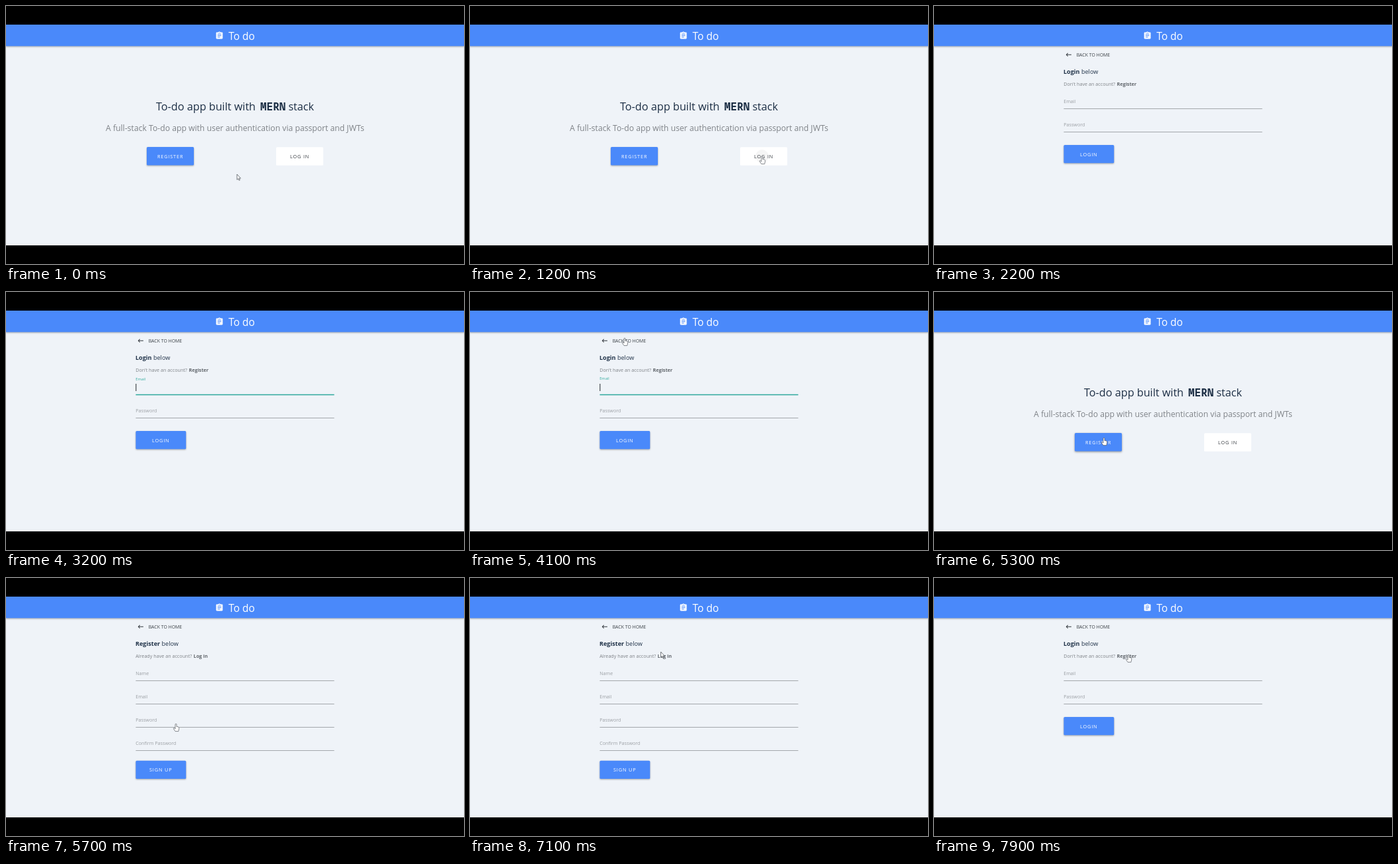
An HTML page that plays this animation: 690 px wide and 388 px high, repeating every 8000 ms.

```html
<!DOCTYPE html>
<html lang="en">
<head>
<meta charset="utf-8">
<title>To do</title>
<style>
  html, body { margin: 0; width: 100%; height: 100%; overflow: hidden; background: #000; }
  svg { display: block; width: 690px; height: 388px; }
  text { font-family: "Open Sans", "Noto Sans", sans-serif; white-space: pre; }
  .blue { fill: #4a89fa; }
  .white { fill: #fff; }
  .brand { font-size: 15.5px; fill: #fff; }
  .title { font-size: 16.2px; fill: #1d2f45; }
  .mono { font: bold 16px "Noto Sans Mono", "DejaVu Sans Mono", monospace; }
  .lead { font-size: 12.18px; fill: #7f8388; text-anchor: middle; }
  .small { font-size: 7.2px; letter-spacing: .9px; }
  .large { font-size: 7.4px; letter-spacing: .8px; fill: #fff; }
  .back { font-size: 6.9px; fill: #3c4248; }
  .head { font-size: 9.1px; fill: #22344a; }
  .note { font-size: 7.2px; fill: #7f8388; }
  .link { font-weight: bold; fill: #62676d; }
  .label { font-size: 7.2px; fill: #9da1a6; }
  .rule { stroke: #a4a8ac; stroke-width: 1; }
  .bold { font-weight: bold; }
  .raised { filter: drop-shadow(0 1px 1px rgba(0, 0, 0, .32)); }
  .hover { filter: drop-shadow(0 1.5px 1.5px rgba(0, 0, 0, .42)); }
</style>
</head>
<body>
<svg viewBox="0 0 690 388">
  <rect y="28" width="690" height="332" fill="#eff3f8"/>
  <g class="raised">
    <rect class="blue" y="28" width="690" height="32.3"/>
  </g>
  <path class="white" transform="translate(314.9 37.9) scale(.55)" d="M19 3h-4.18C14.4 1.84 13.3 1 12 1c-1.3 0-2.4.84-2.82 2H5c-1.1 0-2 .9-2 2v14c0 1.1.9 2 2 2h14c1.1 0 2-.9 2-2V5c0-1.1-.9-2-2-2zm-7 0c.55 0 1 .45 1 1s-.45 1-1 1-1-.45-1-1 .45-1 1-1zm2 14H7v-2h7v2zm3-4H7v-2h10v2zm0-4H7V7h10v2z"/>
  <text class="brand" x="335.2" y="51">To do</text>

  <g id="home">
    <text class="title" x="226" y="157">To-do app built with</text>
    <text class="title mono" x="383" y="157">MERN</text>
    <text class="title" x="425.4" y="157">stack</text>
    <text class="lead" x="345" y="188">A full-stack To-do app with user authentication via passport and JWTs</text>
    <rect id="join" class="blue raised" x="212" y="212" width="71" height="27.6" rx="1.5"/>
    <text class="small white" x="228" y="229">REGISTER</text>
    <circle id="joinRipple" cx="256" cy="224" r="10" fill="#fff" opacity=".15"/>
    <rect class="white" x="407" y="212.3" width="71" height="27.4" rx="1.5"/>
    <circle id="loginRipple" cx="440" cy="226" r="10" opacity=".04"/>
    <text class="small" x="428" y="229" fill="#33383e">LOG IN</text>
  </g>

  <g id="forms">
    <path transform="translate(197.3 67.8) scale(.46)" fill="#33383e" d="M21 11H6.83l3.58-3.59L9 6l-6 6 6 6 1.41-1.41L6.83 13H21v-2z"/>
    <text class="back" x="214.8" y="76">BACK TO HOME</text>
    <g id="login"></g>
    <g id="register"></g>
  </g>

  <rect id="caret" x="195.4" y="138" width="1" height="11" fill="#22262b"/>
  <path id="arrow" fill="#fff" stroke="#555a60" stroke-width=".8" stroke-linejoin="round" d="M0 0V8.3L1.9 6.6L3.1 9.3L4.4 8.7L3.2 6.1H5.6Z"/>
  <path id="hand" fill="#fff" stroke="#555a60" stroke-width=".7" stroke-linejoin="round" d="M-1 1.2Q-1 .3 0 .3T1 1.2V4.5Q3 4.3 4.3 5.4Q5 6.4 4.6 8L3.8 11.6H-1L-3.6 7.8Q-4 6.4-2.7 6.6L-1 8Z"/>
</svg>
<script>
  const LOOP = 8000, STEP = 100;
  const $ = id => document.getElementById(id);
  const show = (id, on) => $(id).style.display = on ? '' : 'none';

  function form({ title, note, link, linkX, fields, button, buttonX, buttonY }) {
    const rows = fields.map((name, i) => {
      const y = 154.5 + i * 35;
      return `<text class="label" x="195.2" y="${y - 8.2}">${name}</text>
        <path class="rule" d="M195.5 ${y}H494.5"/>`;
    });
    return `<text class="head" x="194.9" y="102.3"><tspan class="bold">${title}</tspan> below</text>
      <text class="note" x="195.2" y="119.6">${note}</text>
      <text class="note link" x="${linkX}" y="119.6">${link}</text>
      ${rows.join('')}
      <rect class="blue raised" x="195.5" y="${buttonY}" width="75.7" height="27.3" rx="1.5"/>
      <text class="large" x="${buttonX}" y="${buttonY + 16.5}">${button}</text>`;
  }

  $('login').innerHTML = form({
    title: 'Login', note: "Don't have an account?", link: 'Register', linkX: 275.6,
    fields: ['Email', 'Password'], button: 'LOGIN', buttonX: 220, buttonY: 209
  });
  $('register').innerHTML = form({
    title: 'Register', note: 'Already have an account?', link: 'Log in', linkX: 282.6,
    fields: ['Name', 'Email', 'Password', 'Confirm Password'], button: 'SIGN UP', buttonX: 216, buttonY: 274.8
  });

  // time, pointer shape, tip position
  const pointer = [
    [0, 'arrow', 348, 253], [100, 'arrow', 331, 236], [200, 'arrow', 290, 195],
    [300, 'arrow', 255, 163], [400, 'arrow', 244, 150], [500, 'arrow', 300, 166],
    [600, 'arrow', 370, 191], [700, 'arrow', 425, 215], [800, 'hand', 440, 226],
    [1700, 'arrow', 428, 221], [1800, 'arrow', 393, 198], [1900],
    [2100, 'arrow', 288.5, 154.5], [2200],
    [3700, 'arrow', 255, 126], [3800, 'arrow', 250, 110], [3900, 'arrow', 240, 88],
    [4000, 'hand', 233, 69],
    [4800, 'arrow', 232, 50], [4900, 'arrow', 230, 42], [5000, 'arrow', 240, 110],
    [5100, 'arrow', 250, 180], [5200, 'hand', 256, 219], [6000],
    [6500, 'arrow', 240, 124], [6600, 'arrow', 234, 100], [6700, 'hand', 233, 69],
    [6900, 'arrow', 250, 85], [7000, 'arrow', 275, 104], [7100, 'arrow', 287.5, 111],
    [7300, 'arrow', 287, 115], [7400, 'hand', 292, 118], [7500, 'hand', 293, 120],
    [7600, 'hand', 293, 115]
  ];
  const pages = [[0, 'home'], [1300, 'login'], [4700, 'home'], [5500, 'register'], [7900, 'login']];

  const at = (track, t) => track.findLast(key => key[0] <= t);
  const label = $('login').querySelector('.label');
  const rule = $('login').querySelector('.rule');

  function focusEmail(t) {
    const on = t >= 3100 && t < 4700;
    const p = on ? Math.min(1, (t - 3000) / 300) : 0;
    const k = 1 - (1 - p) ** 2;
    label.setAttribute('y', 146.3 - 14.8 * k);
    label.style.fontSize = 7.2 - 1.5 * k + 'px';
    label.style.fill = on ? '#35ab9f' : '';
    rule.style.stroke = on ? '#2fa99d' : '';
    rule.style.strokeWidth = on ? 1.4 : '';
    show('caret', on && (t < 3600 || (t >= 4100 && t < 4600)));
  }

  function draw() {
    const t = Math.floor(performance.now() % LOOP / STEP) * STEP;
    const page = at(pages, t)[1];
    for (const id of ['home', 'login', 'register']) show(id, id === page);
    show('forms', page !== 'home');
    focusEmail(t);

    $('join').setAttribute('class', 'blue ' + (t >= 5200 && t < 5500 ? 'hover' : 'raised'));
    show('loginRipple', t === 1200);
    show('joinRipple', t === 5400);

    const [, shape, x, y] = at(pointer, t);
    for (const id of ['arrow', 'hand']) show(id, id === shape);
    if (shape) $(shape).setAttribute('transform', `translate(${x} ${y})`);
    requestAnimationFrame(draw);
  }
  draw();
</script>
</body>
</html>
```
